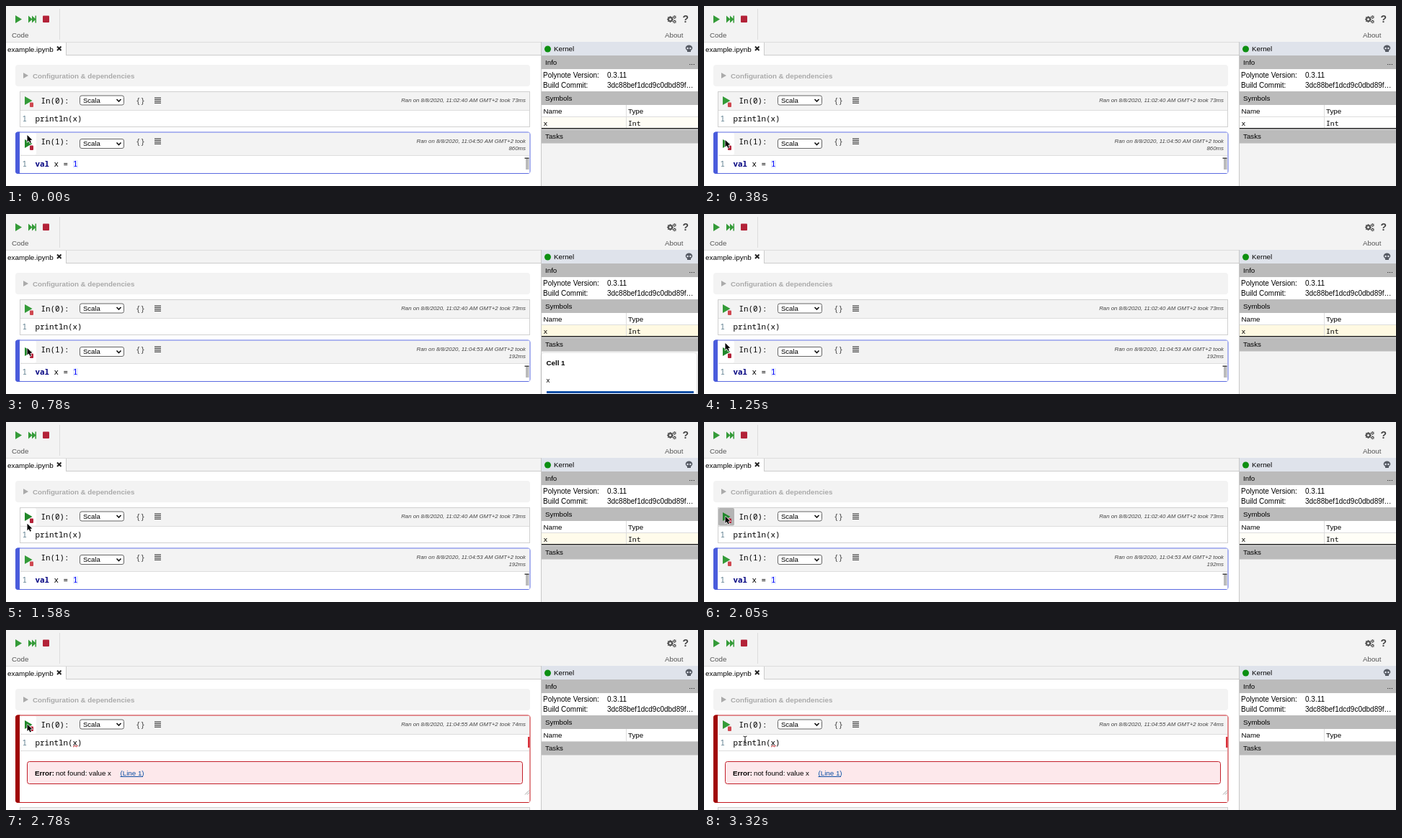
Recreate the animation shown at these times as an HTML page with a canvas. Size 960x251 px, loop 3.39 s.

```html
<!DOCTYPE html>
<html lang="en">
<head>
<meta charset="utf-8">
<title>Notebook cells</title>
<style>
html, body { margin: 0; width: 100%; height: 100%; overflow: hidden; background: #fff; }
canvas { display: block; }
</style>
</head>
<body>
<canvas id="stage" width="960" height="251"></canvas>
<script>
const LOOP = 3390, SIZE = 9.75;
const RUN1 = 575, DONE1 = 775, RUN0 = 2110, DONE0 = 2175;
const GREEN = '#349b38', RED = '#b32238', BAR = '#0b4fa5', PANEL = '#f3f3f3';
// Left bar and outline of a selected cell.
const ACTIVE = ['#4a5cdc', '#5a6ae0'], RUNNING = ['#0c8a12', '#4aa84e'], FAILED = ['#a00505', '#c4161c'];
const SANS = '"Liberation Sans", Arial, sans-serif';
const MONO = '"Noto Sans Mono", "DejaVu Sans Mono", monospace';
const ctx = document.getElementById('stage').getContext('2d');

const clamp = v => Math.max(0, Math.min(1, v));
const between = (t, a, b) => t >= a && t < b;

function rect(x, y, w, h, color) {
  ctx.fillStyle = color;
  ctx.fillRect(x, y, w, h);
}

function round(x, y, w, h, r, fill, stroke) {
  ctx.beginPath();
  ctx.roundRect(x, y, w, h, r);
  if (fill) { ctx.fillStyle = fill; ctx.fill(); }
  if (stroke) { ctx.strokeStyle = stroke; ctx.lineWidth = 1; ctx.stroke(); }
}

function poly(points, color) {
  ctx.beginPath();
  points.forEach(([x, y]) => ctx.lineTo(x, y));
  ctx.closePath();
  ctx.fillStyle = color;
  ctx.fill();
}

function line(points, color, width = 1) {
  ctx.beginPath();
  points.forEach(([x, y], i) => i ? ctx.lineTo(x, y) : ctx.moveTo(x, y));
  ctx.strokeStyle = color;
  ctx.lineWidth = width;
  ctx.stroke();
}

function dot(x, y, r, color) {
  ctx.beginPath();
  ctx.arc(x, y, r, 0, 7);
  ctx.fillStyle = color;
  ctx.fill();
}

function text(str, x, y, { color = '#000', size = SIZE, style = '', family = SANS, align = 'left' } = {}) {
  ctx.font = `${style} ${size}px ${family}`;
  ctx.fillStyle = color;
  ctx.textAlign = align;
  ctx.fillText(str, x, y);
}

const code = (str, x, y, color = '#000', style = '') =>
  text(str, x, y, { color, style, size: 10.83, family: MONO });

const play = (x, y, w, h, color = GREEN) => poly([[x, y], [x + w, y + h / 2], [x, y + h]], color);

function gear(x, y, r, width) {
  ctx.beginPath();
  ctx.arc(x, y, r, 0, 7);
  ctx.strokeStyle = '#555';
  ctx.lineWidth = width;
  ctx.stroke();
  for (let i = 0; i < 8; i++) {
    const a = i * Math.PI / 4, c = Math.cos(a), s = Math.sin(a), far = r + width;
    line([[x + c * r, y + s * r], [x + c * far, y + s * far]], '#555', width * .8);
  }
}

function toolbar() {
  rect(0, 0, 960, 50, PANEL);
  play(13, 13, 9, 11);
  play(31, 13.5, 5.5, 10);
  play(36, 13.5, 5.5, 10);
  rect(40.5, 13.5, 1.5, 10, GREEN);
  round(51, 13.5, 9, 9.5, 1, RED);
  rect(74, 4, 1, 43, '#ddd');
  text('Code', 8, 43.5, { color: '#555' });
  text('About', 914, 43.5, { color: '#555' });
  gear(921.5, 18.5, 2.5, 2);
  gear(927.5, 15.5, 1.4, 1.1);
  gear(927.5, 21.8, 1.4, 1.1);
  text('?', 938.5, 23, { color: '#444', size: 14, style: 'bold' });

  rect(0, 50, 742, 19, PANEL);
  rect(0, 50, 742, 1, '#ddd');
  rect(83, 68, 659, 1, '#ccc');
  rect(0, 51, 83, 18, '#fff');
  rect(83, 51, 1, 18, '#ccc');
  text('example.ipynb', 2, 63.5, { size: 9.9 });
  line([[71, 56.5], [76.5, 62]], '#222', 2);
  line([[76.5, 56.5], [71, 62]], '#222', 2);
}

function configuration() {
  round(13, 82, 714, 30, 4, PANEL);
  play(24, 93, 7, 8, '#aaa');
  text('Configuration & dependencies', 37, 100.5, { color: '#aaa', style: 'bold' });
}

// Draws the frame and header of one cell; returns the height it takes.
function cell(n, y, { info, colors, pressed, hover, body = 50 }) {
  const wrap = info.length - 1;
  const height = body + 7 * wrap, header = 26 + 6 * wrap;
  if (colors) {
    round(13, y - .5, 714.5, height + 1.5, 4, colors[1]);
    round(13, y - .5, 6.5, height + 1.5, [4, 0, 0, 4], colors[0]);
    rect(19, y + .5, 707.5, height - .5, '#fff');
  } else {
    rect(19, y, 708, height, '#d0d0d0');
    rect(20, y + 1, 706, height - 2, '#fff');
  }
  rect(20, y + 1, 706, header - 1, PANEL);
  rect(20, y + header, 706, 1, '#ddd');

  if (pressed || hover) round(20, y + 1, 22, header - 1.5, 2, pressed ? '#b4b4b4' : '#fff');
  const top = y + 7 + 3 * wrap;
  play(26, top, 10.5, 12, hover ? '#21882a' : GREEN);
  round(33, top + 8.5, 5, 6.5, 1, hover ? RED : '#cf4850');

  code(`In(${n}):`, 48.5, y + 16.5);
  const sel = y + 5.5 + 3.5 * wrap;
  round(102.5, sel + .5, 61, 13, 2.5, '#fff', '#666');
  text('Scala', 107, sel + 10, { size: 9.5 });
  line([[153.5, sel + 5.5], [156.5, sel + 8.5], [159.5, sel + 5.5]], '#111', 1.6);
  code('{}', 180, y + 16.5, '#444');
  for (let i = 0; i < 4; i++) rect(206, y + 8.5 + i * 2.4, 9, 1.2, '#444');
  info.forEach((row, i) =>
    text(row, 721, y + 15 + i * 10.3, { size: 7.83, style: 'italic', color: '#444', align: 'right' }));
  code('1', 22.5, y + 41.5 + 6 * wrap, '#5f7f8f');
  return height;
}

function errorResult() {
  rect(20, 168, 706, 1, '#ddd');
  rect(724, 149, 2.5, 15, '#d9303a');
  line(Array.from({ length: 8 }, (_, i) => [93 + i, 162 + (i % 4 < 2 ? .7 : -.7)]), '#c4161c');
  round(29.5, 183.5, 687, 31, 3, '#fde8eb', '#c2202a');
  text('Error:', 40, 202.5, { style: 'bold' });
  text('not found: value x', 69, 202.5);
  text('(Line 1)', 158.5, 202.5, { color: BAR });
  rect(158.5, 204, 31.5, 1, BAR);
  line([[720, 229.5], [726, 223.5]], '#888', .8);
  line([[723, 229.5], [726, 226.5]], '#888', .8);
}

function cells(t, pointer) {
  const failed = t >= DONE0, running0 = between(t, RUN0, DONE0), running1 = between(t, RUN1, DONE1);
  const started = (second, ms) =>
    [`Started at 8/8/2020, 11:04:${second} AM GMT+2 running`, `for ${Math.round(ms)}ms`];
  const info0 = running0 ? started(55, t - RUN0 + 5)
    : [`Ran on 8/8/2020, ${failed ? '11:04:55' : '11:02:40'} AM GMT+2 took ${failed ? 74 : 73}ms`];
  const info1 = running1 ? started(53, t - RUN1 + 9.5)
    : [`Ran on 8/8/2020, 11:04:${t < RUN1 ? 50 : 53} AM GMT+2 took`, `${t < RUN1 ? 860 : 192}ms`];

  const onButton = pointer.x < 42;
  const h0 = cell(0, 119, {
    info: info0,
    colors: failed ? FAILED : running0 ? RUNNING : null,
    pressed: between(t, 1950, RUN0),
    hover: onButton && pointer.y < 145,
    body: failed ? 121 : 50
  });
  code('println(x)', 40.5, running0 ? 166.5 : 160.5);
  if (failed) errorResult();

  const y = 126 + h0;
  cell(1, y, {
    info: info1,
    colors: running1 ? RUNNING : t < RUN0 ? ACTIVE : null,
    pressed: between(t, 450, 545),
    hover: onButton && pointer.y > 175
  });
  rect(93, y + 39, 7, 11, '#e9effd');
  code('val', 40.5, y + 47.5, '#000080', 'bold');
  code('x =', 66.5, y + 47.5);
  code('1', 93, y + 47.5, '#0000ff');
  rect(721, y + 36, 4.5, 16, '#bbb');
  rect(719.5, y + 35.5, 6, 1.5, '#444');
}

function heading(label, y) {
  rect(743, y, 217, 19, '#bbb');
  text(label, 748, y + 12.5);
}

function task(label, y, detail, progress, alpha) {
  const barY = y + (detail ? 53 : 31.5);
  ctx.save();
  ctx.globalAlpha = alpha;
  ctx.shadowColor = '#0003';
  ctx.shadowBlur = 3;
  ctx.shadowOffsetY = 1;
  round(743, y, 215, barY - y + 9.5, 4, '#fff');
  ctx.shadowColor = 'transparent';
  text(label, 749.5, y + 16.5, { style: 'bold' });
  if (detail) text(detail, 749.5, y + 40.5);
  rect(750, barY, 204, 3, '#eee');
  rect(750, barY, 204 * progress, 3, BAR);
  ctx.restore();
}

function kernel(t) {
  rect(742, 50, 218, 201, PANEL);
  rect(742, 50, 218, 19, '#dfe3eb');
  rect(742, 50, 1, 201, '#c8c8c8');
  const busy = between(t, RUN1, DONE1) || between(t, RUN0, DONE0);
  dot(751.5, 60, 4.5, busy ? '#f5dc0a' : '#0c8f12');
  text('Kernel', 760, 63);
  ctx.beginPath();
  ctx.ellipse(947.5, 58.5, 4.8, 4, 0, 0, 7);
  ctx.fillStyle = '#555a63';
  ctx.fill();
  rect(945, 61, 5, 3, '#555a63');
  dot(945.6, 59, 1.2, '#dfe3eb');
  dot(949.4, 59, 1.2, '#dfe3eb');

  heading('Info', 69);
  text('...', 947.5, 81.5);
  rect(743, 88, 217, 31, '#fff');
  [['Polynote Version:', '0.3.11'], ['Build Commit:', '3dc88bef1dcd9c0dbd89f…']].forEach(([key, value], i) => {
    text(key, 745, 100 + i * 14.3, { size: 10 });
    text(value, 834, 100 + i * 14.3, { size: 10 });
  });

  heading('Symbols', 119);
  rect(743, 138, 217, 17, '#fff');
  text('Name', 745.5, 150);
  text('Type', 863, 150);
  const defined = t < RUN0;
  if (defined) {
    const glow = t < DONE1 ? .35 * clamp(1 - t / 450) : clamp((2350 - t) / 1100);
    rect(743, 155, 217, 16, '#fff');
    rect(743, 155, 217, 16, `rgba(255, 249, 226, ${glow})`);
    rect(743, 154, 217, 1, '#ddd');
    rect(743, 170, 217, 1.5, '#222');
    text('x', 745.5, 166.5, { family: MONO });
    text('Int', 863, 166.5, { family: MONO });
  }
  rect(860, 138, 1, defined ? 32 : 17, '#ddd');
  heading('Tasks', defined ? 172.5 : 155.5);

  if (between(t, RUN1, 1000)) task('Cell 1', 194, 'x', t < DONE1 ? 0 : 1, clamp((1000 - t) / 150));
  if (between(t, RUN0, 2600)) task('Cell 0', 177, '', t < DONE0 ? 0 : 1, clamp((2600 - t) / 150));
}

const path = [[0, 29.5, 180], [150, 29.5, 180], [400, 29.5, 187], [950, 29.5, 187], [1200, 29.5, 180],
  [1300, 29.5, 180], [1700, 29.5, 131.5], [2950, 29.5, 131.5], [3250, 57, 153], [LOOP, 57, 153]];

function pointerAt(t) {
  const i = path.findIndex(key => key[0] > t);
  const [t0, x0, y0] = path[i - 1], [t1, x1, y1] = path[i];
  const p = (t - t0) / (t1 - t0), k = p * p * (3 - 2 * p);
  return { x: x0 + (x1 - x0) * k, y: y0 + (y1 - y0) * k };
}

function cursor({ x, y }) {
  if (x > 42 && y > 146) {
    line([[x - 2.5, y - 5], [x, y - 4], [x + 2.5, y - 5]], '#222');
    line([[x, y - 4], [x, y + 4]], '#222');
    line([[x - 2.5, y + 5], [x, y + 4], [x + 2.5, y + 5]], '#222');
    return;
  }
  const arrow = [[0, 0], [0, 9.5], [2.2, 7.5], [3.8, 11], [5.4, 10.3], [3.9, 6.9], [6.8, 6.7]]
    .map(([dx, dy]) => [x + dx, y + dy]);
  line([...arrow, arrow[0]], '#fff', 1.4);
  poly(arrow, '#000');
}

function draw(now) {
  const t = now % LOOP, pointer = pointerAt(t);
  rect(0, 0, 960, 251, '#fff');
  toolbar();
  configuration();
  cells(t, pointer);
  kernel(t);
  cursor(pointer);
  requestAnimationFrame(draw);
}
draw(0);
</script>
</body>
</html>
```
